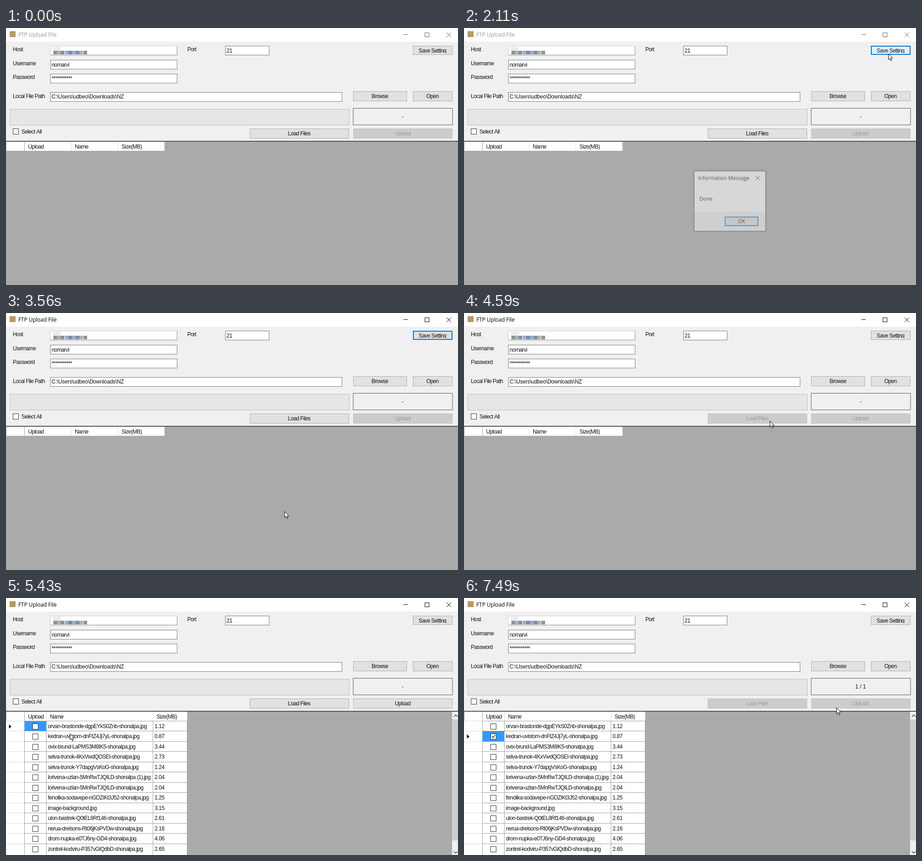
These frames come from a looping animation (992 by 565 pixels, 8 s). An HTML page with a canvas:

```html
<!DOCTYPE html>
<html lang="en">
<head>
<meta charset="utf-8">
<title>FTP Upload File</title>
<style>
html, body { margin: 0; width: 100%; height: 100%; overflow: hidden; background: #aaa; }
canvas { display: block; }
</style>
</head>
<body>
<canvas id="stage" width="992" height="565"></canvas>
<script>
const stage = document.getElementById('stage').getContext('2d');
let ctx = stage;
const LOOP = 8000;
const UI = '12px "Liberation Sans", Arial, sans-serif';
const TITLE = '12px "Open Sans", "Noto Sans", sans-serif';
const BLUE = '#0078d7', INK = '#111';

// Key moments, in ms
const SAVE = 1780, DIALOG = 1990, OK = 3270, LOAD = 4390, LOADED = 4700, TICK = 6040, UPLOAD = 7420;

// Pointer moves; each one slows down towards its end
const home = { x: 661, y: 519, from: 590 };
const moves = [
  { from: 590, to: 1080, x: 855, y: 150 },
  { from: 1080, to: 1570, x: 931, y: 56 },
  { from: 2250, to: 3000, x: 611, y: 436 },
  { from: 3630, to: 4010, x: 510, y: 193 },
  { from: 4010, to: 4320, x: 671, y: 237 },
  { from: 4790, to: 5150, x: 387, y: 297 },
  { from: 5150, to: 5690, x: 66, y: 298 },
  { from: 6510, to: 7220, x: 817, y: 241 }
];

const files = [
  'orvan-brastonde-dgpEYkS0Znb-shonalpa.jpg|1.12',
  'kedran-uvistom-dnFtZ4Jj7yL-shonalpa.jpg|0.87',
  'ovix-brund-LaPMS3M8IK5-shonalpa.jpg|3.44',
  'selva-trunok-4KxVwdQOSEI-shonalpa.jpg|2.73',
  'selva-trunok-Y7dapgVsKoG-shonalpa.jpg|1.24',
  'lorivena-uzlan-5MnRwTJQILD-shonalpa (1).jpg|2.04',
  'lorivena-uzlan-5MnRwTJQILD-shonalpa.jpg|2.04',
  'fenolika-sodavepe-nGDZIKt3J52-shonalpa.jpg|1.25',
  'image-background.jpg|3.15',
  'ulon-bastrek-Q0tEL8Rf146-shonalpa.jpg|2.61',
  'nerua-drelsons-Rt06jKsPVDw-shonalpa.jpg|2.16',
  'drom-nupka-e0TJ6ny-GD4-shonalpa.jpg|4.06',
  'zontrel-kodviru-P357vGlQdbD-shonalpa.jpg|2.65'
].map(line => line.split('|'));

const clamp = v => Math.max(0, Math.min(1, v));
const within = (t, a, b) => t >= a && t < b;
const easeOut = p => 1 - (1 - p) ** 2;

function pointerAt(t) {
  if (t < home.from) return null;
  let { x, y } = home;
  for (const m of moves) {
    const p = easeOut(clamp((t - m.from) / (m.to - m.from)));
    x += (m.x - x) * p;
    y += (m.y - y) * p;
  }
  return { x: Math.round(x), y: Math.round(y) };
}

const inside = (p, x, y, w, h) => p && p.x >= x && p.x < x + w && p.y >= y && p.y < y + h;

function fill(x, y, w, h, color) {
  ctx.fillStyle = color;
  ctx.fillRect(x, y, w, h);
}

function box(x, y, w, h, bg, border, line = 1) {
  fill(x, y, w, h, border);
  fill(x + line, y + line, w - 2 * line, h - 2 * line, bg);
}

function text(str, x, y, { color = INK, align = 'left', font = UI, gap = -0.6 } = {}) {
  ctx.font = font;
  ctx.letterSpacing = gap + 'px';
  ctx.textAlign = align;
  ctx.fillStyle = color;
  ctx.fillText(str, x, y);
}

function stroke(points, color, width = 1) {
  ctx.strokeStyle = color;
  ctx.lineWidth = width;
  ctx.beginPath();
  points.forEach(([x, y]) => ctx.lineTo(x, y));
  ctx.stroke();
}

function shape(points, color) {
  ctx.fillStyle = color;
  ctx.beginPath();
  points.forEach(([x, y]) => ctx.lineTo(x, y));
  ctx.closePath();
  ctx.fill();
}

function cross(x, y, r, color) {
  stroke([[x - r, y - r], [x + r, y + r]], color);
  stroke([[x - r, y + r], [x + r, y - r]], color);
}

function button(label, x, y, w, h, mouse, { off, focus, down } = {}) {
  if (off) box(x, y, w, h, '#ccc', '#bfbfbf');
  else if (down) box(x, y, w, h, '#cce4f7', '#005499');
  else if (inside(mouse, x, y, w, h)) box(x, y, w, h, '#e5f1fb', BLUE, focus ? 2 : 1);
  else box(x, y, w, h, '#e1e1e1', focus ? BLUE : '#adadad', focus ? 2 : 1);
  ctx.save();
  ctx.beginPath();
  ctx.rect(x + 2, y + 2, w - 4, h - 6);
  ctx.clip();
  text(label, x + w / 2 - 0.5, y + 15, { align: 'center', color: off ? '#9c9c9c' : INK });
  ctx.restore();
}

function titleBar(active) {
  const color = active ? '#000' : '#999', icon = active ? '#000' : '#666';
  fill(0, 0, 992, 30, '#fff');
  fill(8, 7, 13, 13, '#b99a5c');
  text('FTP Upload File', 27, 19, { color, font: TITLE, gap: -0.1 });
  fill(872, 14, 10, 1, icon);
  box(919, 10, 10, 10, '#fff', icon);
  cross(972, 15, 5, icon);
}

function input(x, y, w, value, baseline, gap) {
  box(x, y, w, 21, '#fff', '#7a7a7a');
  text(value, x + 3, baseline, { gap });
}

// The host name is hidden by a coarse mosaic
function hostField() {
  box(97, 39, 279, 21, '#fff', '#cfcfcf');
  fill(97, 59, 279, 1, '#8a8a8a');
  fill(375, 40, 1, 20, '#8a8a8a');
  fill(103, 41, 17, 9, '#ececec');
  for (let i = 0; i < 9; i++) {
    const tint = Math.max(0, 32 - 10 * Math.abs(i - 4));
    fill(Math.round(104 + i * 8.2), 50, 8, 8, `hsl(215, ${tint}%, ${i % 2 ? 69 : 57}%)`);
  }
}

function form(t, mouse) {
  fill(0, 30, 992, 218, '#f0f0f0');
  text('Host', 15, 51);
  text('Username', 15, 82);
  text('Password', 15, 112);
  text('Local File Path', 15, 154);
  text('Port', 398, 51);
  hostField();
  input(481, 39, 97, '21', 54, -0.3);
  input(97, 70, 279, 'nomarvi', 85);
  input(97, 100.5, 279, '***********', 115);
  input(97, 141, 641, 'C:\\Users\\udbeo\\Downloads\\NZ', 155, -0.25);

  button('Save Setting', 893, 39, 87, 20, mouse, { down: within(t, SAVE - 70, SAVE), focus: within(t, SAVE, LOAD) });
  button('Browse', 762, 139, 118, 22, mouse);
  button('Open', 893, 139, 87, 22, mouse);

  box(8, 178, 746, 36, '#e6e6e6', '#bcbcbc');
  box(761.5, 176, 219, 37.5, '#f0f0f0', '#555');
  text(t >= UPLOAD + 70 ? '1 / 1' : '-', 870.5, 199, { align: 'center', gap: 0 });
  box(15, 221, 13, 13, '#fff', '#333');
  text('Select All', 34, 232);
  const busy = within(t, LOAD + 70, LOADED) || t >= UPLOAD;
  button('Load Files', 535, 221, 218, 22, mouse, { down: within(t, LOAD, LOAD + 70), off: busy });
  button('Upload', 762, 221, 218, 22, mouse, { off: t < LOADED || busy });
  fill(0, 248, 992, 2, '#555');
}

function header(edges) {
  fill(0, 250, edges[3], 20, '#fff');
  fill(0, 250, 1, 20, '#a0a0a0');
  edges.forEach((x, i) => fill(x, 250, 1, 20, i ? '#dcdcdc' : '#a0a0a0'));
  ['Upload', 'Name', 'Size(MB)'].forEach((label, i) => text(label, edges[i] + 8.5, 265));
}

function rowMark(y, editing) {
  if (editing) stroke([[7, y + 4], [8, y + 1], [13, y - 4], [15, y - 2], [10, y + 3], [7, y + 4]], '#222');
  else shape([[6.5, y - 4], [12, y + 0.5], [6.5, y + 5]], INK);
}

function scrollBar() {
  fill(979, 250, 13, 315, '#f0f0f0');
  fill(979, 267, 13, 266, '#cdcdcd');
  stroke([[983, 261], [987, 257], [991, 261]], '#555', 1.6);
  stroke([[983, 557], [987, 561], [991, 557]], '#555', 1.6);
}

function fileGrid(t, mouse) {
  const edges = [40, 88, 322, 397], rowHeight = 22.5, line = '#a0a0a0', pale = '#dcdcdc';
  const current = t < TICK ? 0 : 1, ticked = t >= TICK + 70;
  fill(0, 250, 398, 315, '#fff');
  header(edges);
  files.forEach(([name, size], i) => {
    const top = Math.floor(270 + i * rowHeight), mid = top + 12;
    fill(0, top, 41, 1, pale);
    fill(41, top, 357, 1, line);
    if (i === current) {
      fill(41, top + 1, 47, 22, '#3399ff');
      rowMark(mid, ticked && t < UPLOAD);
    }
    box(58, mid - 6, 13, 13, '#fff', inside(mouse, 58, mid - 6, 13, 13) ? BLUE : '#333');
    if (i === 1 && ticked) stroke([[61, mid], [63.5, mid + 3], [68.5, mid - 3]], '#222', 1.4);
    text(name, 92, mid + 4);
    text(size, 326, mid + 4, { gap: -0.4 });
  });
  edges.forEach(x => fill(x, 270, 1, 295, line));
  scrollBar();
}

// Painted on its own layer so that it fades as one piece
const layer = new OffscreenCanvas(186, 160).getContext('2d');

function paintDialog(t, mouse) {
  ctx = layer;
  ctx.clearRect(0, 0, 186, 160);
  ctx.save();
  ctx.translate(10, 10);
  ctx.shadowColor = 'rgba(0,0,0,.35)';
  ctx.shadowBlur = 5;
  fill(0, 0, 166, 140, '#555');
  ctx.shadowColor = 'transparent';
  fill(1, 1, 164, 138, '#fff');
  fill(1, 95, 164, 44, '#f0f0f0');
  text('Information Message', 9.5, 21, { font: TITLE, gap: 0 });
  cross(147.5, 16.5, 5, INK);
  text('Done', 12.5, 69, { font: TITLE, gap: 0 });
  const over = inside(mouse, 571, 416, 78, 22);
  box(71, 106, 78, 22, t >= OK - 70 ? '#cce4f7' : over ? '#e5f1fb' : '#e1e1e1', BLUE, 2);
  text('OK', 110, 121, { font: TITLE, align: 'center', gap: 0 });
  ctx.restore();
  ctx = stage;
}

function dialog(t, mouse) {
  const shown = Math.min(clamp((t - DIALOG) / 230), clamp((OK + 140 - t) / 140));
  if (!shown) return;
  paintDialog(t, mouse);
  const size = 0.89 + 0.11 * shown, w = 186 * size, h = 160 * size;
  ctx.globalAlpha = shown;
  ctx.drawImage(layer.canvas, 583.5 - w / 2, 380.5 - h / 2, w, h);
  ctx.globalAlpha = 1;
}

function pointer({ x, y }) {
  const arrow = [[0, 0], [0, 13], [3, 10.4], [5.2, 15.4], [7.3, 14.5], [5.2, 9.6], [9.2, 9.4], [0, 0]]
    .map(([dx, dy]) => [x + dx + 0.5, y + dy + 0.5]);
  shape(arrow, '#fff');
  stroke(arrow, '#000');
}

function draw(now) {
  const t = now % LOOP;
  const mouse = pointerAt(t);
  fill(0, 0, 992, 565, '#aaa');
  titleBar(within(t, 1920, DIALOG) || t >= OK);
  form(t, mouse);
  if (t >= LOADED) fileGrid(t, mouse);
  else header([40, 142.5, 245, 347.5]);
  dialog(t, mouse);
  if (mouse) pointer(mouse);
  requestAnimationFrame(draw);
}
requestAnimationFrame(draw);
</script>
</body>
</html>
```
